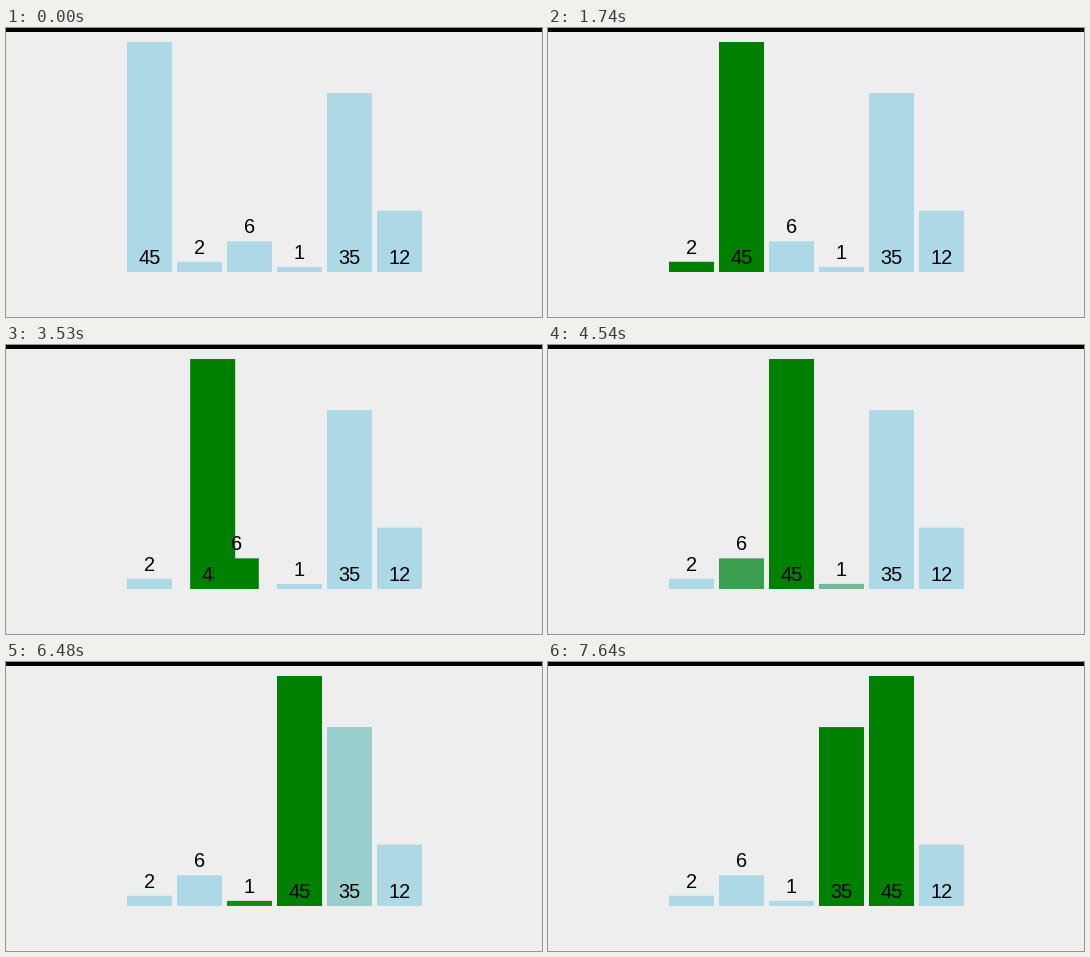
Recreate the animation shown at these times as a matplotlib script. Size 536 by 289 pixels, loop 8000 ms.

```python
import matplotlib.pyplot as plt
import numpy as np
from matplotlib.animation import FuncAnimation
from matplotlib.patches import Rectangle

W, H, DPI = 536, 289, 64
LOOP, STEP = 8000, 20
TWEEN = 250

VALUES = [45, 2, 6, 1, 35, 12]
LEFT, SLOT, BAR_W, BASE = 121, 50, 45, 244
UNIT = 230 / 45
BLUE = np.array([173, 216, 230]) / 255
GREEN = np.array([0, 128, 0]) / 255

# Start of each colour fade and each swap, one per round
COMPARE = [472, 2440, 4430, 6405]
SWAP = [1450, 3429, 5427, 7385]

# The picture refreshes only during these bursts (first, last), every 80 ms
BURSTS = [(500, 660), (1510, 1740), (2520, 2670), (3450, 3680),
          (4540, 4620), (5470, 5700), (6480, 6640), (7410, 7640)]
REFRESH = [0] + [min(t, last) for first, last in BURSTS
                 for t in range(first, last + 80, 80)]


def ease(t, start):
    """Cubic in-out progress of a tween."""
    p = min(max((t - start) / TWEEN, 0), 1)
    return 4 * p ** 3 if p < 0.5 else 1 - 4 * (1 - p) ** 3


def pose(i, t):
    """Slot position and highlight strength of bar i."""
    if i == 0:
        return sum(ease(t, s) for s in SWAP), ease(t, COMPARE[0])
    if i > len(SWAP):
        return i, 0
    slot = i - ease(t, SWAP[i - 1])
    lit = ease(t, COMPARE[i - 1])
    if i < len(COMPARE):
        lit -= ease(t, COMPARE[i])
    return slot, max(lit, 0)


fig = plt.figure(figsize=(W / DPI, H / DPI), dpi=DPI, facecolor="#eeeeee")
ax = fig.add_axes([0, 0, 1, 1])
ax.set_xlim(0, W)
ax.set_ylim(H, 0)
ax.axis("off")
ax.add_patch(Rectangle((0, 0), W, 4, fc="black", lw=0))

bars, labels = [], []
for i, value in enumerate(VALUES):
    height = value * UNIT
    bar = Rectangle((0, BASE - height), BAR_W, height, lw=0,
                    zorder=2 + 2 * i, snap=False)
    bars.append(ax.add_patch(bar))
    # Labels sit above short bars and inside tall ones
    y = BASE - 8 - (height if value < 10 else 0)
    labels.append(ax.text(0, y, str(value), family="Liberation Sans",
                          size=20 * 72 / DPI, ha="center", va="baseline",
                          color="black", zorder=3 + 2 * i))


def draw(frame):
    now = frame * STEP + STEP / 2
    t = max(r for r in REFRESH if r <= now)
    for i, (bar, label) in enumerate(zip(bars, labels)):
        slot, lit = pose(i, t)
        x = LEFT + SLOT * slot
        bar.set_x(x)
        bar.set_facecolor(BLUE + (GREEN - BLUE) * lit)
        label.set_x(x + BAR_W / 2)
    return bars + labels


anim = FuncAnimation(fig, draw, frames=LOOP // STEP, interval=STEP,
                     repeat=True, repeat_delay=0, blit=False)
plt.show()
```
